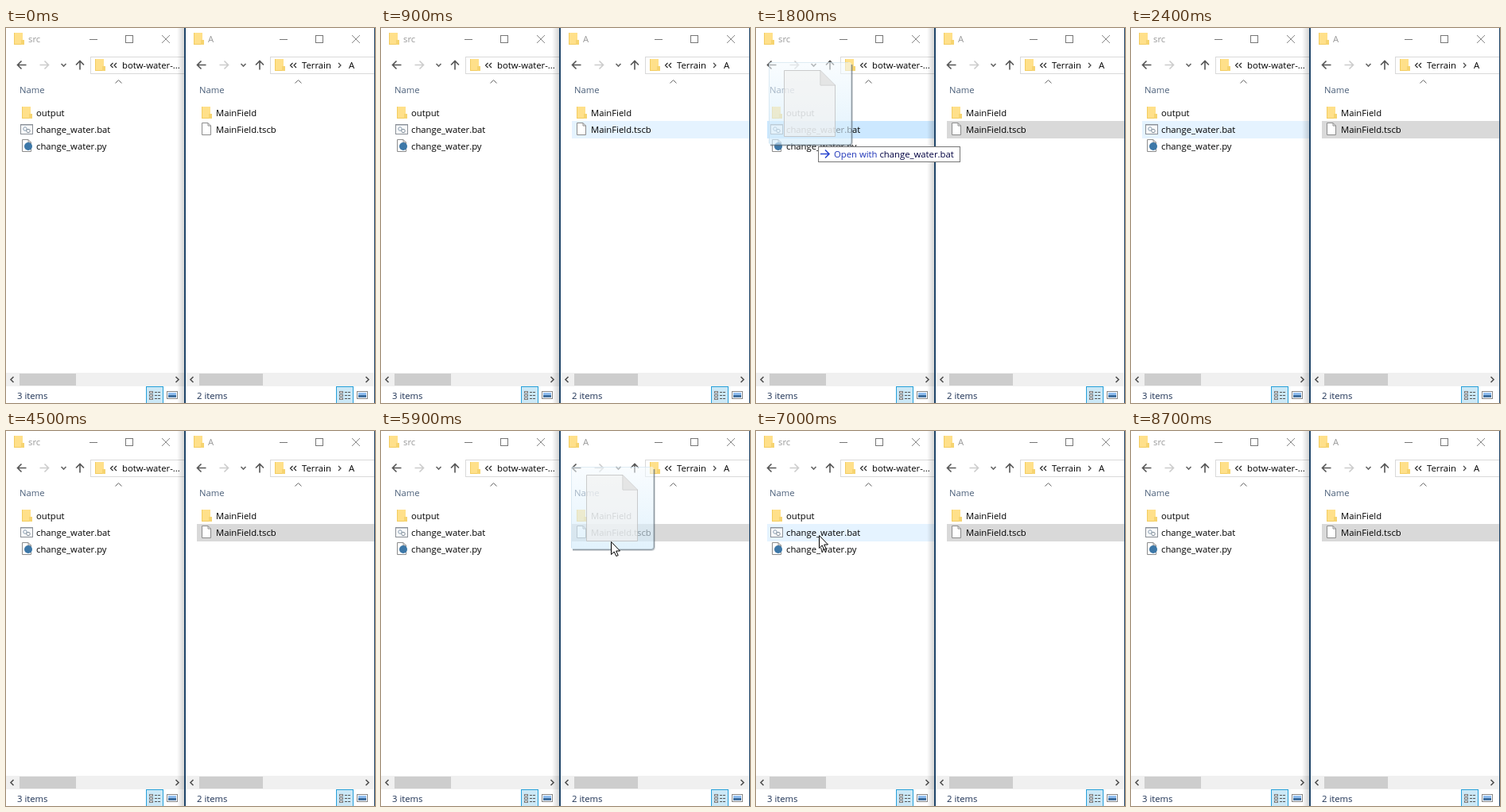
Write an HTML page with a canvas that moves like this. It is 464 px wide and 472 px high and loops after 9 s.

```html
<!DOCTYPE html>
<html lang="en">
<head>
<meta charset="utf-8">
<title>Drag a file onto a script</title>
<style>
  html, body { margin: 0; width: 464px; height: 472px; overflow: hidden; background: #fff; }
  canvas { display: block; }
</style>
</head>
<body>
<canvas id="stage" width="464" height="472"></canvas>
<script>
const ctx = document.getElementById('stage').getContext('2d');
const LOOP = 9000;
const FONT = '11.3px "Open Sans", "Noto Sans", sans-serif';
const HOVER = '#e5f3ff', ACTIVE = '#cce8ff', IDLE = '#d9d9d9';

const DRAGS = [
  { end: 2400, pointer: false, path: [
    [1300, 193, 91], [1400, 109, 101], [1500, 46, 89], [1600, 25, 62],
    [1700, 19, 50], [1800, 16, 43], [1900, 15, 41], [2000, 14, 39]] },
  { end: 7000, pointer: true, path: [
    [5800, 250, 40], [5900, 239, 45], [6000, 205, 62], [6100, 113, 80], [6200, 72, 75],
    [6300, 48, 64], [6400, 36, 52], [6500, 31, 42], [6600, 29, 38]] }
];
// [time, x, y] of the free pointer; no position means hidden
const POINTER = [
  [0], [5200, 338, 125], [5300, 312, 131], [5400, 303, 133], [5600, 300, 132], [5800],
  [7000, 79, 131], [8500, 190, 108], [8600, 300, 100], [8700]
];

const latest = (steps, t) => steps.filter(s => s[0] <= t).pop();

function rect(x, y, w, h, fill, stroke) {
  if (fill) { ctx.fillStyle = fill; ctx.fillRect(x, y, w, h); }
  if (stroke) {
    ctx.lineWidth = 1;
    ctx.strokeStyle = stroke;
    ctx.strokeRect(x + .5, y + .5, w - 1, h - 1);
  }
}

function shape(d, x, y, { fill, stroke, width = 1 }) {
  const path = new Path2D(d);
  ctx.save();
  ctx.translate(x, y);
  if (fill) { ctx.fillStyle = fill; ctx.fill(path); }
  if (stroke) { ctx.strokeStyle = stroke; ctx.lineWidth = width; ctx.stroke(path); }
  ctx.restore();
}

const line = (d, x, y, stroke, width = 1) => shape(d, x, y, { stroke, width });

function text(str, x, y, color = '#000') {
  ctx.font = FONT;
  ctx.fillStyle = color;
  ctx.fillText(str, x, y);
  return ctx.measureText(str).width;
}

function folder(x, y) {
  rect(x, y, 11, 15, '#ffe08a');
  rect(x, y, 1, 15, '#f3cd62');
  rect(x + 1, y + 14, 10, 1, '#f3cd62');
  shape('M9 9H13V15H9Z', x, y, { fill: '#f6d471' });
}

function page(x, y, w, h, fold, fill, edge) {
  shape(`M.5 .5H${w - fold}L${w - .5} ${fold}V${h - .5}H.5Z`, x, y, { fill, stroke: edge });
  line(`M${w - fold} .5V${fold}H${w - .5}`, x, y, edge);
}

const sheet = (x, y) => page(x, y, 12, 16, 4, '#fff', '#8c8c8c');

function disc(x, y, r, fill, stroke) {
  ctx.beginPath();
  ctx.arc(x, y, r, 0, 7);
  if (fill) { ctx.fillStyle = fill; ctx.fill(); }
  if (stroke) { ctx.strokeStyle = stroke; ctx.lineWidth = 1; ctx.stroke(); }
}

function batch(x, y) {
  rect(x, y, 16, 13, '#f8f9fa', '#8b9097');
  rect(x + 1, y + 1, 14, 1, '#c3c9d0');
  disc(x + 6, y + 6, 2.2, '#fff', '#8499ad');
  disc(x + 10, y + 8.5, 2.2, '#fff', '#7f8c99');
}

function script(x, y) {
  sheet(x, y);
  disc(x + 8, y + 9, 5, '#3d78a8');
}

function arrow(x, y, color, dir) {
  line(dir < 0 ? 'M12 0H1M6 -5L1 0L6 5' : 'M0 0H11M6 -5L11 0L6 5', x, y, color, 1.6);
}

function explorer({ x, right, title, crumbs, files, count, thumb, row, rowColor }) {
  // title bar
  folder(x + 10, 6);
  text(title, x + 28, 18, '#999');
  line('M0 .5H10', right - 119, 14, '#777');
  rect(right - 74, 9, 10, 10, null, '#777');
  line('M0 0L10 10M10 0L0 10', right - 28, 9, '#888');

  // navigation
  arrow(x + 13.5, 46.5, '#555', -1);
  arrow(x + 42.5, 46.5, '#ccc', 1);
  line('M0 0L3 3L6 0', x + 69.5, 45, '#666', 1.6);
  line('M5 12V1M0 6L5 1L10 6', x + 88, 40.5, '#555', 1.6);
  rect(x + 106, 36, right - x - 105, 22, null, '#d9d9d9');
  folder(x + 112, 39);
  line('M3.5 0L.5 3L3.5 6M8 0L5 3L8 6', x + 131, 44, '#222', 1.1);
  crumbs.forEach(([name, dx]) => text(name, x + dx, 51));
  if (crumbs.length > 1) line('M0 0L3 3L0 6', x + 192, 44, '#444', 1.2);

  // list
  line('M0 4L4 0L8 4', x + 137.5, 65.5, '#666');
  text('Name', x + 17, 82, '#4c607a');
  if (row >= 0) rect(x + 14, 117 + (row - 1) * 21, right - x - 14, 22, rowColor);
  files.forEach(([name, icon, dx, dy], i) => {
    icon(x + dx, 99 + 21 * i + dy);
    text(name, x + 38, 111 + 21 * i);
  });

  // scrollbar
  rect(x, 434, right - x, 17, '#f0f0f0');
  rect(x + 17, 435, thumb, 15, '#cdcdcd');
  line('M4 0L.5 3.5L4 7', x + 5.5, 439, '#505050', 1.6);
  line('M0 0L3.5 3.5L0 7', right - 10.5, 439, '#505050', 1.6);

  // status bar
  text(count + ' items', x + 14, 467, '#1e3255');
  rect(right - 48, 451, 22, 22, '#cbe8f6', '#26a0da');
  for (let y = 457; y < 468; y += 4) {
    rect(right - 44, y, 5, 3, '#fff', '#777');
    rect(right - 37, y + 1, 3, 1, '#555');
    rect(right - 33, y + 1, 3, 1, '#555');
  }
  rect(right - 22, 457, 14, 10, '#fff', '#888');
  rect(right - 20, 459, 10, 6, '#8fbdf0');
  rect(right - 20, 462, 10, 3, '#3f6f9f');
}

function thumbnail(x, y) {
  ctx.save();
  const glass = ctx.createLinearGradient(0, y, 0, y + 105);
  glass.addColorStop(0, 'rgba(244,250,254,.55)');
  glass.addColorStop(1, 'rgba(209,235,251,.65)');
  ctx.beginPath();
  ctx.roundRect(x, y, 104, 104, 3);
  ctx.fillStyle = glass;
  ctx.fill();
  const rim = 'M2 104.5H101Q104.5 104.5 104.5 101V3';
  line(rim, x, y, 'rgba(90,105,115,.55)');
  line(rim, x, y, 'rgba(90,105,115,.25)', 3);
  line('M.5 102V3Q.5 .5 3 .5H100', x, y, 'rgba(190,215,230,.45)');
  ctx.globalAlpha = .7;
  page(x + 19, y + 10, 65, 84, 19, '#f2f2f2', '#b8b8b8');
  shape('M46 .5L64.5 19H46Z', x + 19, y + 10, { fill: '#dedede' });
  ctx.restore();
}

function tooltip(x, y, verb, target) {
  ctx.font = FONT;
  const label = target ? verb + ' ' : verb;
  const w = Math.round(ctx.measureText(label + target).width) + 28;
  rect(x, y, w, 20, '#fff', '#767676');
  if (verb === 'Copy') line('M0 5H10M5 0V10', x + 4, y + 5, '#2b47d0', 2);
  else arrow(x + 3, y + 9.5, '#2b47d0', 1);
  const dx = text(label, x + 20, y + 14, '#1f35b8');
  text(target, x + 20 + dx, y + 14, '#000040');
}

function pointer(x, y) {
  shape('M.5 .5V16.5L4.2 13L6.8 18.5L9.2 17.5L6.7 12H11.5Z', x, y, { fill: '#fff', stroke: '#000' });
}

// Right window with its border and the shadow it casts to the left
function frontEdge() {
  const shade = ctx.createLinearGradient(215, 0, 224, 0);
  shade.addColorStop(0, 'rgba(0,0,0,0)');
  shade.addColorStop(1, 'rgba(0,0,0,.17)');
  rect(215, 0, 9, 472, shade);
  rect(224, 0, 2, 472, '#1f4569');
  rect(463, 0, 1, 472, '#1f4569');
}

function draw(t) {
  const drag = DRAGS.find(d => t >= d.path[0][0] && t < d.end);
  const [, px, py] = latest(POINTER, t);
  let leftRow = -1, leftColor = HOVER, rightRow = 1, rightColor = IDLE;
  let thumb, tip;

  if (t < 900) rightRow = -1;
  else if (t < 1100) rightColor = HOVER;
  else if (t < 1300 || (t >= 5200 && t < 5800)) rightColor = ACTIVE;

  if ((t >= 2400 && t < 4500) || (t >= 7000 && t < 8500)) leftRow = 1;
  else if (t >= 8500 && t < 8600) leftRow = 0;

  if (drag) {
    const [, x, y] = latest(drag.path, t);
    thumb = { x, y, cx: x + 50, cy: y + 94 };
    if (thumb.cx < 224) {
      if (thumb.cy < 139) {
        leftRow = 1;
        leftColor = ACTIVE;
        tip = ['Open with', 'change_water.bat'];
      } else tip = thumb.cy < 160 ? ['Copy', ''] : ['Move to', 'src'];
    }
  }

  rect(0, 0, 464, 472, '#fff');
  explorer({
    x: 0, right: 224, title: 'src', crumbs: [['botw-water-...', 146]],
    files: [['output', folder, 20, 0], ['change_water.bat', batch, 18, 1], ['change_water.py', script, 20, -1]],
    count: 3, thumb: 71, row: leftRow, rowColor: leftColor
  });
  explorer({
    x: 226, right: 463, title: 'A', crumbs: [['Terrain', 146], ['A', 205]],
    files: [['MainField', folder, 20, 0], ['MainField.tscb', sheet, 20, -1]],
    count: 2, thumb: 80, row: rightRow, rowColor: rightColor
  });
  frontEdge();

  if (thumb) {
    thumbnail(thumb.x, thumb.y);
    if (tip) tooltip(thumb.x + 62, thumb.y + 106, ...tip);
    if (drag.pointer) pointer(thumb.cx, thumb.cy);
  } else if (px) pointer(px, py);
}

const start = performance.now();
(function tick() {
  draw((performance.now() - start) % LOOP);
  requestAnimationFrame(tick);
})();
</script>
</body>
</html>
```
